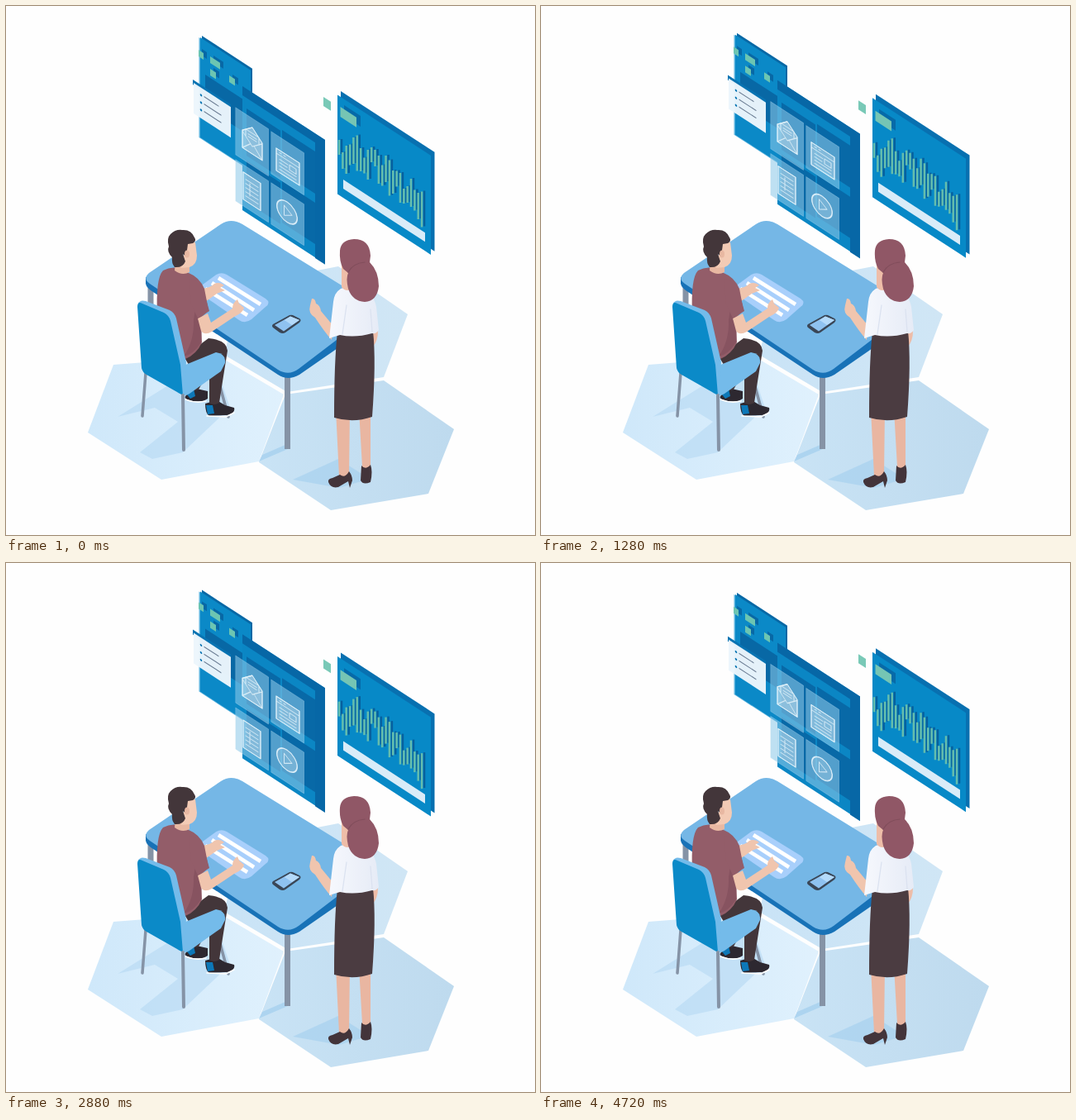
An HTML page for the animation above (4800 ms loop, 640x640 px).

```html
<!DOCTYPE html>
<html lang="en">
<head>
<meta charset="utf-8">
<title>Team at the table</title>
<style>
  html, body { margin: 0; width: 100%; height: 100%; overflow: hidden; background: #fefefe; }
  svg { display: block; width: 100vw; height: 100vh; }
</style>
</head>
<body>
<svg viewBox="0 0 640 640" fill="none" stroke-linecap="round" stroke-linejoin="round">
  <defs>
    <linearGradient id="floorL"><stop stop-color="#cfe8fa"/><stop offset="1" stop-color="#e0f1fd"/></linearGradient>
    <linearGradient id="floorB"><stop stop-color="#c9e3f5"/><stop offset="1" stop-color="#bedaee"/></linearGradient>
    <linearGradient id="floorR"><stop stop-color="#c9e3f6"/><stop offset="1" stop-color="#d0e6f5"/></linearGradient>
    <linearGradient id="blouse"><stop stop-color="#f6f8fd"/><stop offset="1" stop-color="#e6ebf6"/></linearGradient>
  </defs>

  <g id="floor">
    <path fill="url(#floorR)" d="M264 422L340 467L457 449L486 373L402 315L284 338Z"/>
    <path fill="url(#floorL)" d="M99 516L130 434L258 424L336 470L306 551L188 573Z"/>
    <path fill="url(#floorB)" d="M306 552L338 470L457 453L542 512L511 590L393 610Z"/>
    <path fill="#b3d8f2" opacity=".55" d="M135 497L209 451L258 447L271 486L214 540L177 548L162 540L208 503L180 486Z"/>
    <path fill="#9bcbed" opacity=".6" d="M306 551L310 543L340 530L341 536Z"/>
    <path fill="#9bcbed" opacity=".5" d="M347 573L402 548L440 572L403 583Z"/>
  </g>

  <g id="panels"></g>

  <g id="table">
    <path stroke="#8593a6" stroke-width="7" stroke-linecap="butt" d="M175 340V363M340.500 446V536"/>
    <path fill="#1872b7" d="M169 328V336Q170 341 178 346L329 446Q341 454 355 446L430 394L438 377Z"/>
    <path fill="#75b7e6" d="M173 323L260 264Q272 256 286 264L432 354Q445 363 434 378L354 439Q342 448 329 440L174 336Q165 330 173 323Z"/>
    <path fill="#a8cffb" d="M238 337L253 326Q260 321 267 325L314 354Q321 359 314 364L297 379Q289 385 282 380L238 350Q231 344 238 337Z"/>
    <path stroke="#fff" stroke-width="4.500" stroke-linecap="butt" d="M257 329L308 361M249 335L300 368M241 342L292 374"/>
    <path fill="#3a4656" d="M323 385L343 374Q346 373 349 375L355 378Q358 380 355 383L338 395Q335 397 331 395L323 389Q321 387 323 385Z"/>
    <path fill="#8fc2f0" d="M325 386L344 375.500L355 380L336 393.500Z"/>
    <path fill="#b4dafa" d="M337 380L344 375.500L355 380L346 386Z"/>
  </g>

  <g id="man">
    <path stroke="#8593a6" stroke-width="3.500" d="M169 444L165 496M254 442L269 497"/>
    <path fill="#2d2830" d="M217 472L226 462L244 466V475Q236 481 222 477Q215 475 217 472Z"/>
    <path fill="#0d78b8" d="M218 469L227 463L229 472L223 475Z"/>
    <path stroke="#fff" stroke-width="1.500" d="M217 476Q229 481 242 478"/>
    <path fill="#2d2830" d="M241 481L255 477L265 483L276 486Q278 493 267 495L246 496Q241 493 241 481Z"/>
    <path fill="#0d78b8" d="M242 483L250 483L252 493L244 494Z"/>
    <path stroke="#fff" stroke-width="1.500" d="M243 496L266 497L276 492"/>
    <path fill="#43363a" d="M215 424L245 402Q267 404 268 417L263 448L258 480Q251 484 246 480L246 440L233 464Q223 467 220 463L223 437Z"/>
    <path fill="#f0c5ae" d="M236 342Q248 341 252 336Q259 333 264 338L259 341L265 344L255 348L241 358Z"/>
    <path fill="#935d69" d="M190 320Q199 315 208 317L221 323Q234 328 240 342L245 368L236 377L237 407Q231 421 217 427L190 411L183 374Q181 329 190 320Z"/>
    <path fill="#875360" d="M231 353L236 376L236 407Q226 422 215 424Q228 405 227 380Z"/>
    <path fill="#f0c5ae" d="M232 378L244 372L248 383L274 366Q274 359 280 355L282 360L288 365Q287 371 276 376L249 394Q240 399 236 393Z"/>
    <path fill="#935d69" d="M221 330Q234 330 239 344L246 369L232 378L224 360Z"/>
    <path fill="#e8b8a2" d="M205 309L222 309V322Q213 327 204 320Z"/>
    <path fill="#f3cbb5" d="M217 285L229 286L231 302Q231 313 222 316L212 317Z"/>
    <path fill="#43363a" d="M199 276Q205 270 213 271Q224 270 228 280Q231 284 226 287L220 288L218 303L214 300L217 309Q214 317 204 316Q200 311 201 304Q194 297 197 291Q194 281 199 276Z"/>
    <ellipse fill="#e8b8a2" cx="219" cy="300" rx="3" ry="4.500"/>
    <path fill="#74bbea" d="M210 437L254 419Q267 421 265 432L260 442L222 469Q216 473 211 469Z"/>
    <path fill="#74bbea" d="M160 360Q162 355 169 357L198 368Q204 371 206 378L218 431L216 471L208 468Z"/>
    <path fill="#0b8ac8" d="M159 364Q159 357 165 360L191 371Q197 374 199 381L211 434L214 471L170 446Q165 443 164 438Z"/>
    <path stroke="#8593a6" stroke-width="4" d="M214 471L215 537"/>
  </g>

  <g id="woman">
    <path fill="#e9b6a1" d="M399 488H416L415 568Q410 576 403 569ZM427 488H441L441 558Q437 565 431 558Z"/>
    <path fill="#43343a" d="M390 576Q389 572 395 571L404 567Q410 572 415 563Q419 568 419 574L416 583L414 575L402 582Q393 584 390 576ZM430 556Q435 562 441 555Q444 563 441 576Q432 580 429 574Z"/>
    <path fill="#eebda8" d="M441 390L450 393Q450 405 444 412L439 405Z"/>
    <path fill="#f0c5ae" d="M370 354Q374 353 375 360Q380 362 381 369L396 387L394 404Q385 394 374 377Q365 372 368 362Z"/>
    <path fill="#4b3c41" d="M401 394Q424 401 444 393Q448 430 443 497Q420 505 397 498Q397 429 401 394Z"/>
    <path fill="url(#blouse)" d="M405 342L427 335Q445 348 448 364L451 392Q448 397 443 396Q422 402 404 398L391 402L396 358Q397 347 405 342Z"/>
    <path stroke="#dbe2f0" stroke-width="1.300" d="M412 362L407 397M441 367L443 394"/>
    <path fill="#eebda8" d="M406 309L423 315L420 342Q411 347 406 340Z"/>
    <path fill="#905766" d="M404 296Q405 283 421 282Q440 282 441 302L440 310Q451 321 451 339Q449 357 434 358Q419 357 414 342Q411 329 414 323L408 318Q403 309 404 296Z"/>
    <path stroke="#804d5b" stroke-width="1.200" d="M414 322Q420 311 434 310"/>
  </g>
</svg>
<script>
  const LOOP = 4800;
  const SLOPE = 0.65;

  // Upright rectangle on a wall that runs down to the right.
  const wall = (x, y, w, h, fill, extra = '') =>
    `<path fill="${fill}" ${extra} d="M${x} ${y}l${w} ${w * SLOPE}v${h}l${-w} ${-w * SLOPE}Z"/>`;
  const layer = (dy, body, early = '') => `<g data-dy="${dy}" ${early}>${body}</g>`;
  const onWall = (x, y, body) =>
    `<g transform="matrix(1 ${SLOPE} 0 1 ${x} ${y})">${body}</g>`;

  const folder = wall(233.5, 38, 62, 121, '#5cb4df') +
    wall(237, 36, 61, 122, '#0868a5') +
    wall(235, 38, 61, 121, '#0b89c7') +
    wall(241, 83, 46, 39, '#0868a5');

  const chip = (x, y, w, h) =>
    wall(x + 4, y - 1, w, h, '#0868a5') + wall(x, y, w, h, '#6cc5b2');
  const chips = chip(233, 53, 6, 8) + chip(247, 61, 12, 8) +
    chip(247, 76, 7, 8) + chip(270, 84, 7, 8);

  const bullets = [0, 1, 2].map(i =>
    `<circle cx="9" cy="${9 + i * 9}" r="1.300" fill="#0873b2"/>
     <path stroke="#66788f" stroke-width="1.200" d="M13 ${8.5 + i * 9}h${i ? 20 : 17}"/>`).join('');
  const note = wall(226, 89, 46, 6, '#0873b2') +
    wall(227, 93, 45, 37, '#edf6fc', 'opacity=".97"') + onWall(227, 93, bullets);

  const icons = [
    '<path fill="#ffffff55" d="M8 22L20 11L32 22V43H8Z"/><path d="M8 22L20 11L32 22V43H8ZM8 23L20 34L32 23M8 43L18 32M32 43L22 32M12 26V18H28V26M15 22H25M15 25H25"/>',
    '<path fill="#ffffff44" d="M6 16H34V43H6Z"/><path d="M6 16H34V43H6ZM6 22H34M10 19H12M15 19H17M10 27H20M10 31H19M10 35H30M10 39H30M22 26H30V32H22Z"/>',
    '<path fill="#ffffff44" d="M9 9H30V42H9Z"/><path d="M9 9H30V42H9ZM12 16H27M12 21H27M12 26H27M12 31H27M12 36H27M17 18V33"/>',
    '<circle fill="#ffffff33" cx="19" cy="23" r="12.500"/><circle cx="19" cy="23" r="12"/><path d="M15.500 17L25 23L15.500 29Z"/>'
  ];
  const spots = [[278, 123, 57], [321, 152, 51], [278, 186, 50], [321, 214, 50]];
  const tiles = spots.map(([x, y, h], i) =>
    wall(x, y, 39.5, h, '#8dcaea', 'fill-opacity=".56" stroke="#b4dbef" stroke-opacity=".5" stroke-width=".7"') +
    onWall(x, y, `<g stroke="#e8f5fc" stroke-opacity=".8">${icons[i]}</g>`)).join('');
  const tileShades = spots.map(([x, y, h]) =>
    wall(Math.max(286, x + 13), y + (x < 300 ? 1 : -2), x < 300 ? 41 : 40, h, '#0869a7')).join('');
  const board = wall(286, 97, 100, 150, '#0b86c4') +
    wall(286, 97, 100, 11, '#0767a6') + tileShades +
    wall(374, 155, 12, 150, '#0767a6');

  const mids = [171, 187, 186, 180, 175, 178, 186, 193, 192, 180, 184, 198,
    205, 197, 208, 213, 209, 220, 230, 228, 226, 235, 242, 246];
  const bars = mids.map((mid, i) => {
    const x = 403 + i * 4.35;
    const h = [18, 20, 34, 25, 32, 43, 28, 19, 36][i % 9];
    return `<path stroke="#07609d" stroke-width="2.500" stroke-linecap="butt" d="M${x + 3} ${mid - h / 2 - 1}v${h}"/>
      <path stroke="#65bdad" stroke-width="2.500" stroke-linecap="butt" d="M${x} ${mid - h / 2}v${h}"/>`;
  }).join('');
  const chart = wall(405, 103, 113.5, 120, '#0870b0') +
    wall(401, 107.5, 113, 120, '#0789c7') + bars +
    wall(408, 210, 99, 11, '#d9ecf8');
  const label = wall(409, 120, 20, 13, '#076aa8') + wall(404.5, 122, 19.5, 12, '#75c5b4');
  const marker = wall(384, 110, 9, 11, '#79c9b7');

  document.getElementById('panels').innerHTML =
    layer(-6, folder, 'data-early') + layer(-7, chips) +
    layer(-13.5, board) + layer(-13.5, tiles) + layer(-10.5, note) +
    layer(7, chart) + layer(9, label) + layer(8, marker);

  const layers = [...document.querySelectorAll('[data-dy]')];

  function draw(t) {
    const even = 1 - Math.abs(t / 2400 - 1);
    const early = t < 2320 ? t / 2320 : Math.max(0, 1 - (t - 2320) / 1300);
    for (const el of layers) {
      const k = 'early' in el.dataset ? early : even;
      el.setAttribute('transform', `translate(0 ${(el.dataset.dy * k).toFixed(2)})`);
    }
  }

  const start = performance.now();
  function tick() {
    draw((performance.now() - start) % LOOP);
    requestAnimationFrame(tick);
  }
  tick();
</script>
</body>
</html>
```
